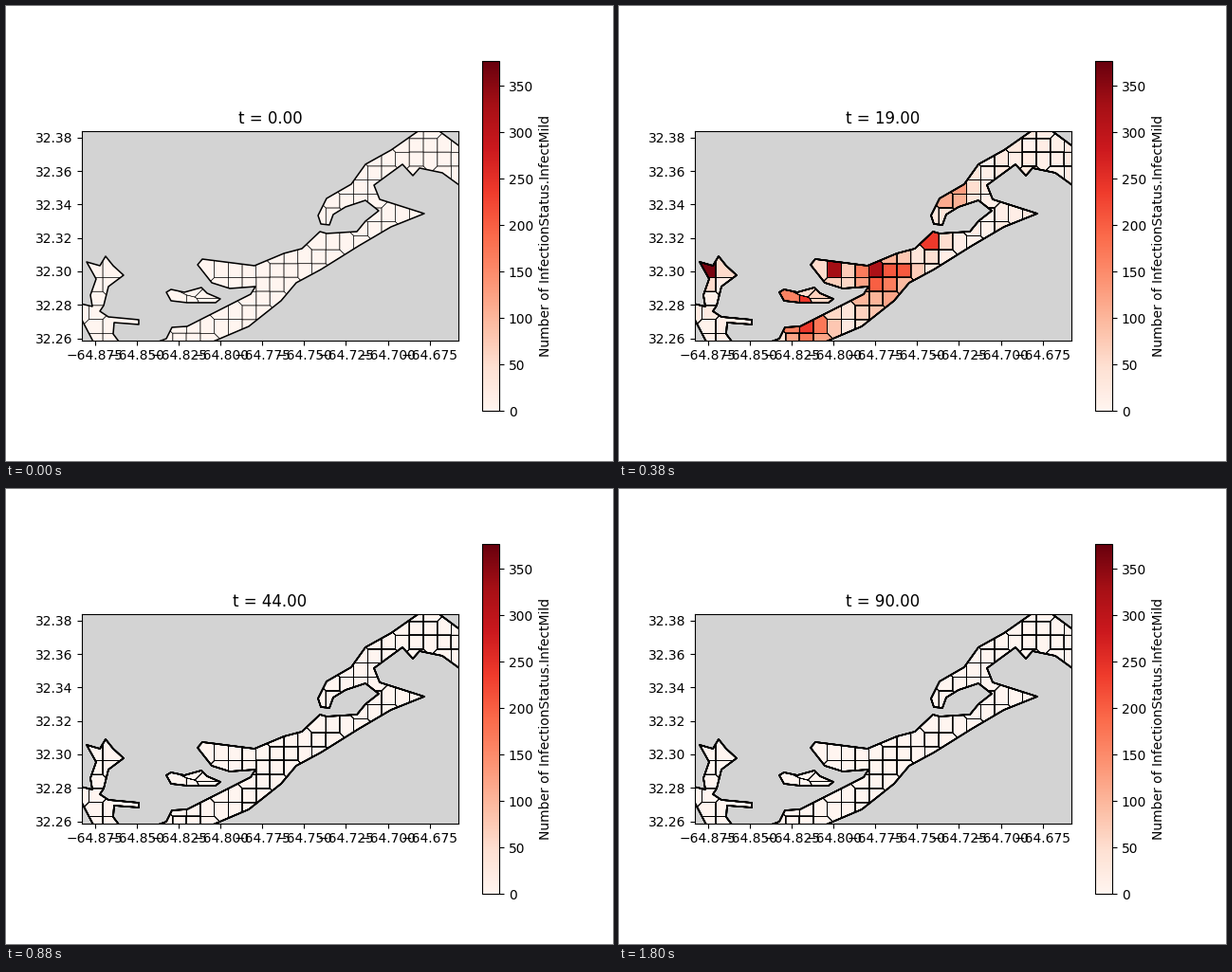
Recreate the animation shown at these times as a matplotlib script. Size 640 px wide and 480 px high, loop 1.82 s.

```python
import numpy as np
import matplotlib.pyplot as plt
from matplotlib.animation import FuncAnimation
from matplotlib.cm import ScalarMappable
from matplotlib.collections import PolyCollection
from matplotlib.colors import Normalize
from matplotlib.path import Path
from matplotlib.ticker import MultipleLocator

FRAMES, INTERVAL = 91, 20
COLS, ROWS = 27, 15
STEP = 1 / 120                       # grid spacing in degrees
WEST, NORTH = -64.8829, 32.3838
LEFT, TOP, CELL = 80.0, 132.2, 396.8 / COLS
PEAK, WIDTH, LAYERS = 377, 5.5, 5

# Coastline corners in stage pixels
MAIN = [(446, 124), (489, 156), (489, 197), (460, 176), (436, 171), (429, 179),
        (418, 167), (388, 189), (394, 204), (441, 219), (406, 233), (372, 253),
        (332, 278), (306, 292), (290, 311), (256, 338), (209, 358), (150, 358),
        (169, 351), (175, 339), (191, 338), (258, 304), (263, 296), (236, 298),
        (217, 292), (202, 273), (207, 267), (262, 274), (293, 261), (312, 256),
        (331, 238), (338, 240), (370, 238), (379, 227), (393, 216), (379, 205),
        (358, 212), (345, 220), (341, 231), (332, 230), (329, 221), (338, 203),
        (364, 188), (379, 167), (406, 152)]
WESTERN = [(85, 270), (99, 274), (105, 264), (113, 274), (124, 284), (108, 296),
           (103, 316), (99, 322), (108, 328), (140, 331), (140, 336), (114, 334),
           (113, 346), (122, 358), (94, 358), (70, 312), (91, 317), (89, 305),
           (95, 288)]
ISLET = [(169, 302), (174, 299), (188, 302), (206, 297), (212, 303), (226, 309),
         (221, 313), (191, 313), (174, 311)]

# Outbreak centres: column, row, strength, radius in cells
OUTBREAKS = [(1, 10, 360, 0.5), (10, 10, 290, 0.45), (13, 10, 270, 0.6),
             (13.5, 11, 130, 1.8), (15, 10, 150, 0.4), (17, 8, 240, 0.5),
             (18.5, 4.5, 160, 0.8), (8, 14, 220, 1.2)]


def to_grid(points):
    return (np.array(points) - (LEFT, TOP)) / CELL


def to_map(points):
    return np.array(points) * (STEP, -STEP) + (WEST, NORTH)


def clip(poly, site, other):
    """Keep the part of poly that lies nearer to site than to other."""
    nx, ny = other[0] - site[0], other[1] - site[1]
    c = (nx * (other[0] + site[0]) + ny * (other[1] + site[1])) / 2
    dist = [nx * x + ny * y - c for x, y in poly]
    if max(dist) <= 0:
        return poly
    if min(dist) >= 0:
        return []
    out = []
    for k, (p, d) in enumerate(zip(poly, dist)):
        q, e = poly[k - 1], dist[k - 1]
        if (d < 0) != (e < 0):
            f = e / (e - d)
            out.append((q[0] + f * (p[0] - q[0]), q[1] + f * (p[1] - q[1])))
        if d < 0:
            out.append(p)
    return out


def voronoi_part(coast, site):
    near = sorted(sites, key=lambda s: (s[0] - site[0]) ** 2 + (s[1] - site[1]) ** 2)
    for other in near[1:]:
        coast = clip(coast, site, other)
        if not coast:
            break
    return coast


def populated(site, reach=0.06):
    """True for a grid point on, or just off, one of the two large islands."""
    around = [(site[0] + dx, site[1] + dy)
              for dx in (-reach, 0, reach) for dy in (-reach, 0, reach)]
    return any(Path(c).contains_points(around).any() for c in coasts[:2])


coasts = [to_grid(c) for c in (MAIN, WESTERN, ISLET)]
sites = [(i, j) for j in range(ROWS + 1) for i in range(COLS + 1)
         if populated((i, j))]
parts, owner = [], []
for n, site in enumerate(sites):
    for coast in coasts:
        part = voronoi_part(coast.tolist(), site)
        if len(part) > 2:
            parts.append(to_map(part))
            owner.append(n)

# Each cell follows a bell curve, highest around the outbreak centres
rng = np.random.default_rng(4)
col, row = np.array(sites).T
height = rng.uniform(3, 28, len(sites))
for x, y, strength, radius in OUTBREAKS:
    height += strength * np.exp(-((col - x) ** 2 + (row - y) ** 2) / (2 * radius ** 2))
middle = rng.uniform(18, 22.5, len(sites))


def infected(day):
    return height * np.exp(-(day - middle) ** 2 / (2 * WIDTH ** 2))


fig, ax = plt.subplots(figsize=(6.4, 4.8), dpi=100)
ax.set_facecolor("lightgray")
ax.set_aspect("equal")
ax.set_xlim(WEST, WEST + COLS * STEP)
ax.set_ylim(NORTH - ROWS * STEP, NORTH)
ax.xaxis.set_major_locator(MultipleLocator(0.025))
ax.yaxis.set_major_locator(MultipleLocator(0.02))
shades = ScalarMappable(Normalize(0, PEAK), "Reds")
fig.colorbar(shades, ax=ax, label="Number of InfectionStatus.InfectMild")
title = ax.set_title("")

shores = [to_map(c) for c in coasts]
land = Path.make_compound_path(*[Path(np.vstack([s, s[:1]]), closed=True)
                                 for s in shores])


def add_polygons(polys, zorder, **style):
    artist = PolyCollection(polys, zorder=zorder, **style)
    ax.add_collection(artist, autolim=False)
    return artist


cells = add_polygons(parts, 0, edgecolor="none")
cells.set_clip_path(land, ax.transData)

# Outlines are painted again each day, so thin lines grow darker
outlines = []
for k in range(LAYERS):
    grid = add_polygons(parts, 1, facecolor="none", edgecolor="black", linewidth=0.35)
    grid.set_clip_path(land, ax.transData)
    shore = add_polygons(shores, 1, facecolor="none", edgecolor="black", linewidth=1.1)
    outlines.append((grid, shore))


def update(day):
    title.set_text(f"t = {day:.2f}")
    cells.set_facecolor(shades.to_rgba(infected(day)[owner]))
    for k, pair in enumerate(outlines):
        for artist in pair:
            artist.set_visible(k <= day)
    return [title]


anim = FuncAnimation(fig, update, frames=FRAMES, interval=INTERVAL,
                     repeat=True, repeat_delay=0)
plt.show()
```
